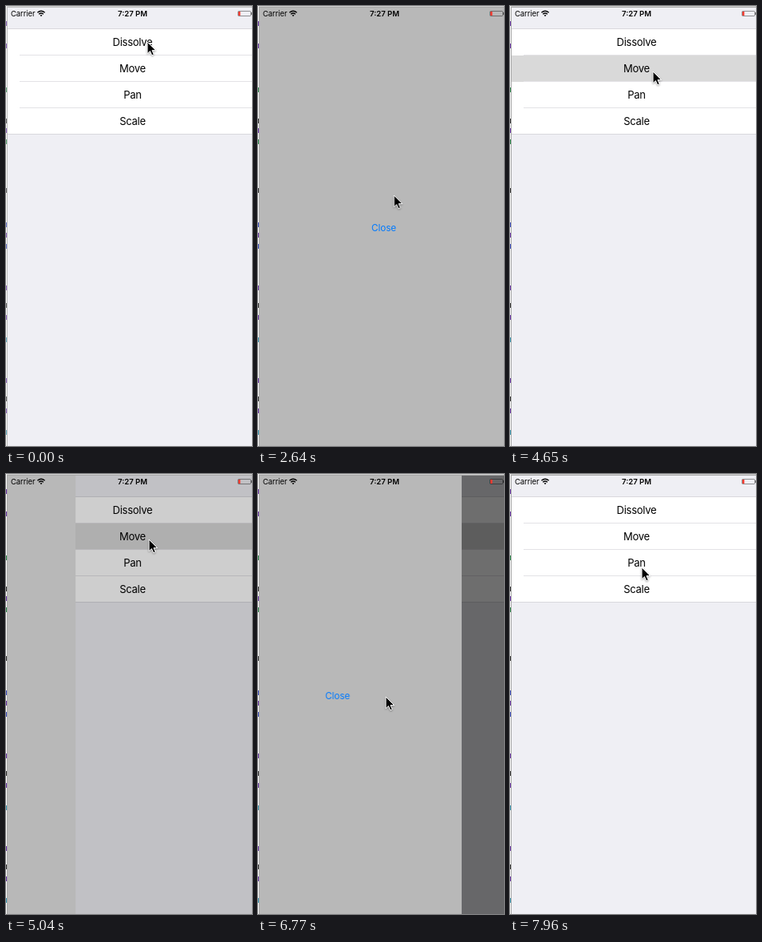
Animation of 308 by 551 pixels, one loop 7990 ms. Source, as an HTML page:

```html
<!DOCTYPE html>
<html lang="en">
<head>
<meta charset="utf-8">
<title>Transitions</title>
<style>
  html, body { margin: 0; width: 100%; height: 100%; overflow: hidden; }
  body { position: relative; background: #fff; font-family: Inter, Roboto, sans-serif; color: #000; }
  #edge, #screen, #screen div, #edge i, svg { position: absolute; }
  #edge { inset: 0; background: linear-gradient(90deg, #fff 1px, #a6a6a6 1px); }
  #edge i { left: 0; width: 1px; }
  #top { left: 1px; top: 0; width: 307px; height: 1px; background: #d2d2d2; position: absolute; }
  #screen { left: 2px; top: 2px; width: 311px; height: 549px; overflow: hidden; background: #efeff4; }
  #table { left: 0; top: 26px; width: 311px; height: 131px; background: #fff; border: solid #d9d8dd; border-width: 1px 0; }
  #screen .row { left: 0; width: 311px; height: 33px; font: 13px/33px Inter, Roboto, sans-serif; letter-spacing: -.25px; text-align: center; }
  .row span { position: relative; left: 1px; }
  .line { left: 15px; right: 0; height: 1px; background: #e3e2e6; }
  #dim { inset: 0; background: #000; opacity: 0; }
  #panel { left: 0; top: 0; width: 311px; height: 549px; background: #b8b8b8; opacity: 0; }
  #close { left: 0; width: 311px; top: 266px; font-size: 11.7px; line-height: 20px; letter-spacing: -.1px; text-align: center; color: #007aff; }
  #screen .status { top: 1px; font-size: 9.5px; line-height: 14px; white-space: nowrap; }
  #carrier { left: 4px; letter-spacing: -.1px; }
  #clock { left: 1px; width: 311px; text-align: center; font-weight: 600; }
  svg { left: 0; top: 0; overflow: visible; }
  #cursor { width: 14px; height: 20px; filter: drop-shadow(0 1px 1px rgba(0, 0, 0, .35)); }
</style>
</head>
<body>
<div id="edge"></div>
<div id="top"></div>
<div id="screen">
  <div id="table"></div>
  <div id="dim"></div>
  <div id="panel"><div id="close">Close</div></div>
  <div id="carrier" class="status">Carrier</div>
  <div id="clock" class="status">7:27 PM</div>
  <svg width="311" height="20">
    <g fill="none" stroke="#000" stroke-width="1.4">
      <path d="M37.4 6.3Q42 2 46.6 6.3M39.2 8.3Q42 5.8 44.8 8.3"/>
      <path d="M40.6 9.6Q42 8.5 43.4 9.6L42 11.2Z" fill="#000" stroke="none"/>
    </g>
    <rect x="288.5" y="4.5" width="16" height="6" rx="1" fill="none" stroke="#000" stroke-opacity=".5" stroke-width=".8"/>
    <rect x="289" y="5" width="2.4" height="5" fill="#ff3b30"/>
    <rect x="305" y="6" width="1.2" height="3" fill="#000" opacity=".5"/>
  </svg>
</div>
<svg id="cursor" viewBox="0 0 14 20">
  <path d="M1 1V15.6L4.4 12.5L6.7 17.8L9.2 16.7L6.9 11.6H11.6Z" stroke="#fff" stroke-width="1" stroke-linejoin="round"/>
</svg>
<script>
const LOOP = 7990;
const WIDTH = 311;
const $ = id => document.getElementById(id);

function add(parent, tag, className, style) {
  const el = document.createElement(tag);
  el.className = className;
  Object.assign(el.style, style);
  return parent.appendChild(el);
}

// Steps are [time, value, easing towards the next step].
function play(el, prop, steps) {
  const last = steps[steps.length - 1][1];
  const frames = [[0, steps[0][1]], ...steps, [LOOP, last]].map(([t, value, easing = 'linear']) =>
    ({ offset: t / LOOP, [prop]: value, easing }));
  el.animate(frames, { duration: LOOP, iterations: Infinity });
}

// Slivers of the editor window behind the left edge
const ink = { p: '#6a35a8', g: '#2c8a4b', k: '#333', b: '#3b4cc0', c: '#3a9ab5' };
const marks = 'p22 p50 g105 k144 p156 g170 k231 b274 p287 b301 p353 k375 p390 c418 p469 k492 p507 c534';
for (const mark of marks.split(' ')) {
  add($('edge'), 'i', '', { top: mark.slice(1) - 3 + 'px', height: '6px', background: ink[mark[0]] });
}

const rows = ['Dissolve', 'Move', 'Pan', 'Scale'].map((name, i) => {
  const row = add($('table'), 'div', 'row', { top: i * 33 + 'px' });
  add(row, 'span', '', {}).textContent = name;
  if (i) add($('table'), 'div', 'line', { top: i * 33 - 1 + 'px' });
  return row;
});

const clear = 'rgba(217, 217, 217, 0)', grey = 'rgb(217, 217, 217)';
play(rows[0], 'backgroundColor', [[1620, clear], [1620, grey], [2960, grey], [3260, clear]]);
play(rows[1], 'backgroundColor', [[4650, clear], [4650, grey], [6830, grey], [7290, clear]]);

const shift = x => `translateX(${x}px)`;
const on = shift(0), off = shift(-WIDTH), ease = 'ease-in-out';
play($('panel'), 'opacity', [[1620, 0, ease], [1930, 1], [2960, 1, ease], [3280, 0], [3300, 0], [3300, 1]]);
play($('panel'), 'transform', [[3290, on], [3290, off], [4700, off, ease], [5640, on], [6490, on, ease], [7430, off]]);
play($('dim'), 'opacity', [[4700, 0, ease], [5640, .7], [6490, .7, ease], [7430, 0]]);
play($('close'), 'opacity', [[2810, 1], [2810, .25], [2960, .25], [3100, 1], [6340, 1], [6340, .25], [6520, .25], [6680, 1]]);

const at = (x, y) => `translate(${x}px, ${y}px)`;
play($('cursor'), 'transform', [
  [2230, at(176, 44), 'ease-in'], [2490, at(194, 150), 'ease-out'], [2790, at(158, 275)],
  [3320, at(158, 275), ease], [3750, at(178, 81)],
  [5480, at(178, 81), ease], [6040, at(159, 278)],
  [7400, at(159, 278), ease], [7960, at(164, 116)]
]);

play($('edge'), 'opacity', [[1500, .75], [1500, 1]]);
</script>
</body>
</html>
```
